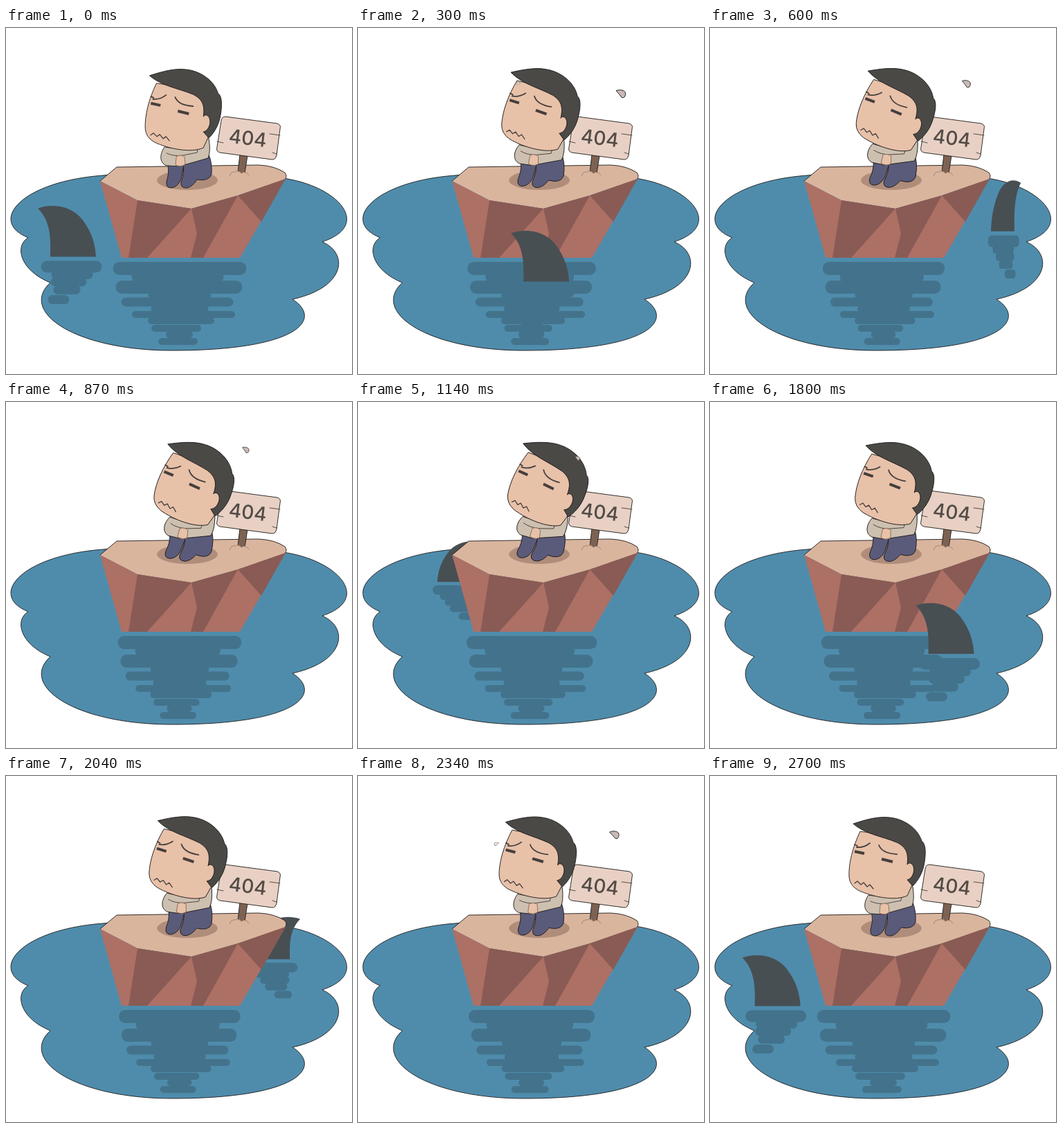
Write an HTML page that moves like this. It is 500 by 500 pixels and loops after 2.73 s.

```html
<!DOCTYPE html>
<html lang="en">
<head>
<meta charset="utf-8">
<title>404 island</title>
<style>
  html, body { margin: 0; height: 100%; overflow: hidden; background: #fff; }
  svg { display: block; width: 100vw; height: 100vh; }
  .ink { stroke: #1d1a19; stroke-width: .9; stroke-linejoin: round; }
  .line { fill: none; stroke: #453f3d; stroke-linecap: round; stroke-linejoin: round; }
  .mirror { fill: none; stroke: #43738c; stroke-linecap: round; }
  .light { fill: #ad7065; }
  .dark { fill: #895b54; }
  .skin { fill: #e8c1a9; }
  .hair { fill: #4a4946; }
  .shirt { fill: #cdc0b0; }
  .jeans { fill: #5a5b7b; }
  .board { fill: #e8d1c4; }
  text { font: 500 28px Inter, sans-serif; fill: #544c48; text-anchor: middle; }
</style>
</head>
<body>
<svg id="stage" viewBox="0 0 500 500">
  <defs><path id="drop" d="M-7-4C-2-7 7-6 7-1Q7 6 2 5Q-1 1-7-4Z"/></defs>

  <path fill="#4f8cac" class="ink" d="M32 303C-26 280 20 222 140 213Q250 200 400 217C480 228 530 285 457 309C495 325 492 375 414 392C458 420 425 466 240 466C100 466 18 410 64 368C20 350 12 315 32 303Z"/>
  <g id="rockMirror" class="mirror">
    <path stroke-width="19" d="M164 347.5H338M168 374.5H332"/>
    <path stroke-width="13" d="M188 360H308M212 386H290M173 396H322M216 406H286"/>
    <path stroke-width="10" d="M187 414H326M210 423H296M215 434H277M236 443H265M225 453H272"/>
  </g>

  <g id="rock">
    <path fill="#d9b59e" d="M136 221L160 201L365 198Q388 199 403 209Q407 214 403 219L335 242L268 261L190 249Z"/>
    <path fill="none" class="ink" d="M136 221L160 201L365 198Q388 199 403 209Q407 214 403 219"/>
    <path class="light" d="M136 221L190 249L268 261L335 242L404 218L338 332H167Z"/>
    <path class="dark" d="M190 249L268 261L204 332H177ZM268 261L335 242L285 332H267L276 297ZM335 242L404 218L369 280Z"/>
  </g>

  <g class="ink">
    <path fill="#7d6253" d="M338 182L349 184L345 210L335 209Z"/>
    <path class="board" d="M317 128L392 138Q398 140 396 146L391 184Q389 191 384 190L309 180Q303 178 305 172L311 134Q312 128 317 128Z"/>
    <path class="line" d="M305 164L314 166M396 155L381 153M391 182L385 180"/>
  </g>
  <path fill="#d9b59e" stroke="#a88570" d="M323 214Q325 207 331 208Q336 205 340 210Q347 206 351 213"/>
  <text transform="translate(349.5 159) rotate(7)" y="10">404</text>

  <ellipse cx="262" cy="220" rx="44" ry="14" fill="#af8d7a"/>
  <g id="man">
    <g class="ink">
      <path class="jeans" d="M234 199Q236 210 232 222Q231 232 240 231Q249 229 253 218L257 198Z"/>
      <path class="jeans" d="M256 198Q258 210 253 223Q252 232 262 231Q270 229 276 219Q294 222 297 211Q298 195 293 183L258 196Z"/>
      <path class="shirt" d="M229 172C222 182 221 195 232 199L250 200L292 188Q296 178 293 160L286 157C275 174 250 176 229 172Z"/>
      <path class="line" d="M232 181Q242 186 256 184L276 180L277 174"/>
      <path class="skin" stroke="#8a6a5a" d="M246 186Q252 182 258 186L259 197Q252 202 245 198Z"/>
      <path class="skin" d="M217 80C206 103 200 127 201 146Q202 158 214 165C235 175 268 181 285 173L292 158L300 125L285 90Z"/>
      <path class="hair" d="M207 69C228 62 245 58 260 60C280 62 300 75 306 94C312 98 312 112 310 124C308 140 300 152 293 159L285 150C295 148 298 130 290 126Q286 125 285 128C287 112 284 103 270 96C248 87 224 84 207 69Z"/>
    </g>
    <path class="line" stroke-width="1.8" d="M209 99L213 101M212 103Q222 104 231 97M244 100Q249 112 270 113"/>
    <path class="line" style="stroke-linecap:butt" stroke-width="4" d="M209 109L223 112M248 120L264 124"/>
    <path class="line" stroke-width="1.3" d="M209 155L213 152L218 157L222 154L227 160L231 157L236 163"/>
    <use id="rightDrop" href="#drop" class="ink" fill="#c9bab5"/>
    <use id="leftDrop" href="#drop" class="ink" fill="#eee8e6"/>
  </g>

  <g id="shark">
    <g class="mirror">
      <path stroke-width="17" d="M-29 14.5H42"/>
      <path stroke-width="13" d="M-16 26H31M-17 36.5H22M-13 48H13M-21 62H-3"/>
    </g>
    <path fill="#474f53" d="M-42-70C-18-78 8-72 22-54C36-36 41-18 42 0H-24C-23-28-24-52-42-70Z"/>
  </g>
</svg>
<script>
  const LOOP = 2730, SWIM = 1348, TILT = 13.9, TURN = 1410, REST = 2700;
  const $ = id => document.getElementById(id);
  const mod = (a, n) => ((a % n) + n) % n;
  const clamp = (v, lo, hi) => Math.min(hi, Math.max(lo, v));
  const move = (id, transform) => $(id).setAttribute('transform', transform);

  // Turning points of the lap around the rock: time, x, waterline
  const lap = [
    [0, 88, 330], [62, 138, 368], [452, 339, 364],
    [600, 427.6, 294], [720, 376, 262], [1140, 148.6, 260]
  ];

  // Closed monotone cubic through the keys
  function sample(keys, period, t) {
    const n = keys.length;
    const key = i => {
      const [time, ...rest] = keys[mod(i, n)];
      return [time + Math.floor(i / n) * period, ...rest];
    };
    const i = keys.findLastIndex(k => k[0] <= t);
    const [a, b, c, d] = [i - 1, i, i + 1, i + 2].map(key);
    const span = c[0] - b[0], u = (t - b[0]) / span, v = 1 - u;
    const slope = (p, q, j) => (q[j] - p[j]) / (q[0] - p[0]);
    const tangent = (p, q) => p * q > 0 ? 2 * p * q / (p + q) : 0;
    return [1, 2].map(j => {
      const s = slope(b, c, j);
      const enter = tangent(slope(a, b, j), s), leave = tangent(s, slope(c, d, j));
      return b[j] + (c[j] - b[j]) * u * u * (3 - 2 * u) + span * u * v * (enter * v - leave * u);
    });
  }

  // Leans quickly, then slows down, both ways
  function lean(t) {
    const ease = u => clamp(u, 0, 1) ** .6;
    return t < TURN ? ease(t / TURN) : 1 - ease((t - TURN) / (REST - TURN));
  }

  function placeDrop(id, p, x, y, size, flip) {
    $(id).style.display = p < 1 ? '' : 'none';
    move(id, `translate(${x} ${y}) scale(${size * flip} ${size})`);
  }

  function draw(t) {
    move('man', `rotate(${TILT * lean(t)} 265 212)`);

    const ripple = .955 + .045 * Math.cos(4 * Math.PI * t / LOOP);
    move('rockMirror', `translate(251 0) scale(${ripple} 1) translate(-251 0)`);

    // The fin turns round at the middle of its lap and shrinks at the far side
    const [x, y] = sample(lap, SWIM, t % SWIM);
    const facing = clamp((y - 306) / 24, -1, 1);
    const size = Math.min(1, 1 - .2 * (294 - y) / 34);
    $('stage').insertBefore($('shark'), facing < 0 ? $('rock') : null);
    move('shark', `translate(${x} ${y}) scale(${facing * size} ${size})`);

    const p = mod(t - 1125, LOOP / 8) / 200;
    placeDrop('rightDrop', p, 281 + 87 * p, 81 - 100 * p + 104 * p * p, .5 + .5 * p, 1);
    const q = mod(t - 240, 990) / 200;
    placeDrop('leftDrop', q, 238 - 50 * q - 34 * q * q, 67 + 57 * q, .2 + .42 * q, -1);
  }

  const start = performance.now();
  function tick() {
    draw((performance.now() - start) % LOOP);
    requestAnimationFrame(tick);
  }
  tick();
</script>
</body>
</html>
```
